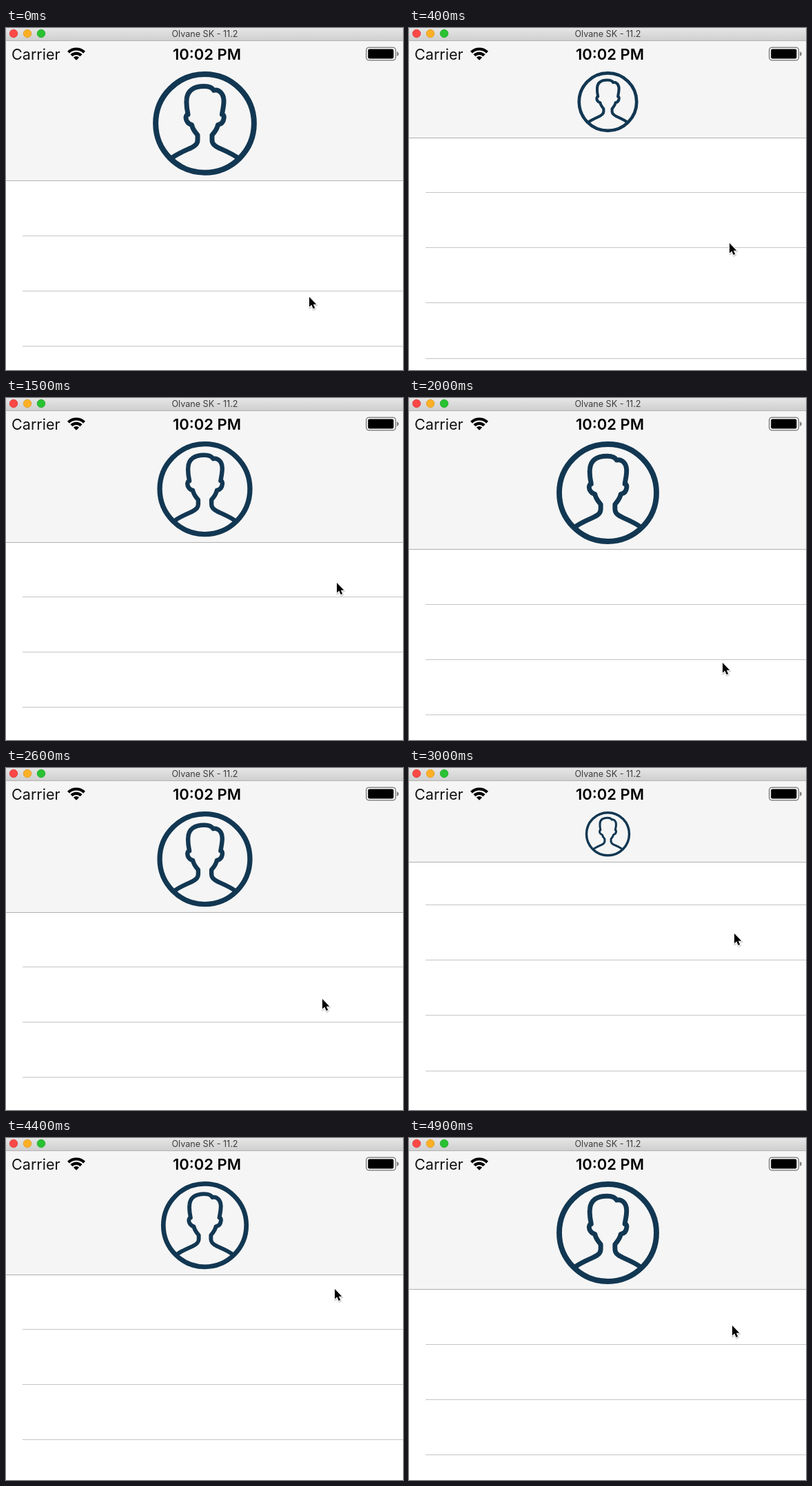
Write an HTML page that moves like this. It is 576x496 px and loops after 5000 ms.

```html
<!DOCTYPE html>
<html lang="en">
<head>
<meta charset="utf-8">
<title>Shrinking header</title>
<style>
html, body { margin: 0; width: 100%; height: 100%; overflow: hidden; background: #fff; }
svg { display: block; width: 576px; height: 496px; }
text { font-family: Inter, Roboto, sans-serif; }
</style>
</head>
<body>
<svg viewBox="0 0 576 496" xmlns="http://www.w3.org/2000/svg">
  <defs>
    <linearGradient id="bar" x1="0" y1="0" x2="0" y2="1">
      <stop offset="0" stop-color="#e6e6e6"/>
      <stop offset="1" stop-color="#cfcfcf"/>
    </linearGradient>
  </defs>
  <rect width="576" height="496" fill="#fff"/>
  <g id="rows" fill="#c5c5c7"></g>

  <rect id="header" width="576" fill="#f5f5f5"/>
  <rect id="edge" width="576" height="1" fill="#b0b0b0"/>

  <g id="avatar" fill="none" stroke="#123752">
    <circle r="71.5" stroke-width="8"/>
    <path stroke-width="7" stroke-linejoin="round" d="M-49,51 C-42,45 -30,40 -21,36 C-13,32 -10.5,29 -10.5,24
      V17 C-14,13 -18,8 -19,2 C-24,1 -28,-4 -27.5,-9 C-27,-12 -26,-13 -24.5,-13
      C-26,-20 -27,-28 -26.5,-34 C-26,-48 -16,-54 -1,-54 C6,-54 11,-52 13,-48
      C20,-50 27,-44 27.5,-34 C28,-27 26,-20 25,-13 C28,-13 28,-9 27.5,-7
      C27,-2 24,1 19,2 C18,8 14,13 10.5,17 V24 C10.5,29 13,32 21,36 C30,40 42,45 49,51"/>
  </g>

  <rect width="576" height="18" fill="url(#bar)"/>
  <rect y="18" width="576" height="1" fill="#b4b4b4"/>
  <g stroke-width=".8">
    <circle cx="11" cy="8" r="5.8" fill="#fc4846" stroke="#df3c3a"/>
    <circle cx="31" cy="8" r="5.8" fill="#fdb025" stroke="#de9a1f"/>
    <circle cx="51" cy="8" r="5.8" fill="#29c232" stroke="#20a829"/>
  </g>
  <text x="288.5" y="13" font-size="12.6" text-anchor="middle" fill="#3c3c3c">Olvane SK - 11.2</text>

  <text x="8" y="46" font-size="21.6" fill="#111">Carrier</text>
  <text x="291.5" y="46" font-size="22" font-weight="600" text-anchor="middle" fill="#000">10:02 PM</text>
  <g id="wifi" transform="translate(102 46.8)" fill="none" stroke="#000" stroke-width="4.2"></g>
  <rect x="522.7" y="28.2" width="42.6" height="18.6" rx="4" fill="#fff" stroke="#858585" stroke-width="1.6"/>
  <rect x="525.2" y="30.6" width="37.2" height="13.9" rx="2" fill="#000"/>
  <path d="M567,34.3 q2.8,.6 2.8,3.3 t-2.8,3.3 z" fill="#858585"/>

  <g id="cursor">
    <path d="M0,0 V14.6 L3.3,11.6 L5.7,17 L8.2,15.9 L5.8,10.7 H10.3 Z" transform="translate(.5 1.3)"
      fill="none" stroke="#000" stroke-opacity=".16" stroke-width="3" stroke-linejoin="round"/>
    <path d="M0,0 V14.6 L3.3,11.6 L5.7,17 L8.2,15.9 L5.8,10.7 H10.3 Z"
      fill="#000" stroke="#fff" stroke-width="1.8" stroke-linejoin="round" paint-order="stroke"/>
  </g>
</svg>
<script>
const LOOP = 5000, STEP = 100, ROW = 80.2, MIN_HEADER = 136;
const NS = 'http://www.w3.org/2000/svg';
const $ = id => document.getElementById(id);

// [time, y of the first row line]
const scroll = [
  [0, 300.5], [100, 300], [200, 286], [400, 238], [600, 202], [700, 199.3], [1000, 199.3],
  [1100, 200.3], [1200, 200.3], [1300, 214], [1400, 257], [1500, 288], [1600, 296],
  [1700, 298.7], [2400, 298.7], [2600, 288], [2800, 232], [3000, 198], [3300, 194],
  [3600, 194], [3700, 191], [4100, 191], [4200, 195], [4300, 239], [4400, 277],
  [4500, 294], [4600, 298.7]
];

// [time, x, y] of the pointer tip
const pointer = [
  [0, 440, 390], [100, 443, 381], [200, 450, 364], [400, 465, 312], [600, 478, 270],
  [700, 480, 266], [900, 480, 266], [1000, 479, 215], [1100, 478, 170], [1200, 478, 170],
  [1300, 478, 193], [1500, 480, 268], [1600, 474, 305], [1800, 460, 365], [2000, 455, 384],
  [2300, 457, 354], [2400, 457, 354], [2600, 459, 335], [2800, 466, 278], [3000, 472, 240],
  [3300, 475, 227], [3600, 475, 227], [3700, 475, 224], [4100, 476, 137], [4200, 476, 139],
  [4400, 477, 219], [4600, 475, 255], [4800, 470, 271], [4900, 469, 272]
];

function at(keys, t) {
  const i = keys.findIndex(k => k[0] > t);
  if (i < 0) return keys[keys.length - 1].slice(1);
  const a = keys[i - 1], b = keys[i], p = (t - a[0]) / (b[0] - a[0]);
  return a.slice(1).map((v, n) => v + (b[n + 1] - v) * p);
}

function add(parent, tag, attrs) {
  const el = document.createElementNS(NS, tag);
  for (const k in attrs) el.setAttribute(k, attrs[k]);
  return $(parent).appendChild(el);
}

const wedge = r => {
  const d = r * Math.SQRT1_2;
  return `M${-d},${-d} A${r},${r} 0 0 1 ${d},${-d}`;
};
add('wifi', 'path', { d: wedge(16.3) });
add('wifi', 'path', { d: wedge(10) });
add('wifi', 'path', { d: wedge(5.8) + ' L0,0 Z', fill: '#000', stroke: 'none' });

const rows = [0, 1, 2, 3].map(() => add('rows', 'rect', { x: 24, width: 552, height: 1 }));

function draw(t) {
  const [top] = at(scroll, t);
  const [x, y] = at(pointer, t);
  const h = Math.max(MIN_HEADER, top - 79.3);
  const r = (h - 70.5) / 2;
  rows.forEach((el, i) => el.setAttribute('y', Math.round(top + i * ROW)));
  $('header').setAttribute('height', Math.round(h));
  $('edge').setAttribute('y', Math.round(h));
  $('avatar').setAttribute('transform', `translate(288.5 ${63 + r}) scale(${r / 75.5})`);
  $('cursor').setAttribute('transform', `translate(${x} ${y})`);
}

function tick() {
  const t = performance.now() % LOOP;
  draw(Math.floor(t / STEP) * STEP);
  requestAnimationFrame(tick);
}
tick();
</script>
</body>
</html>
```
